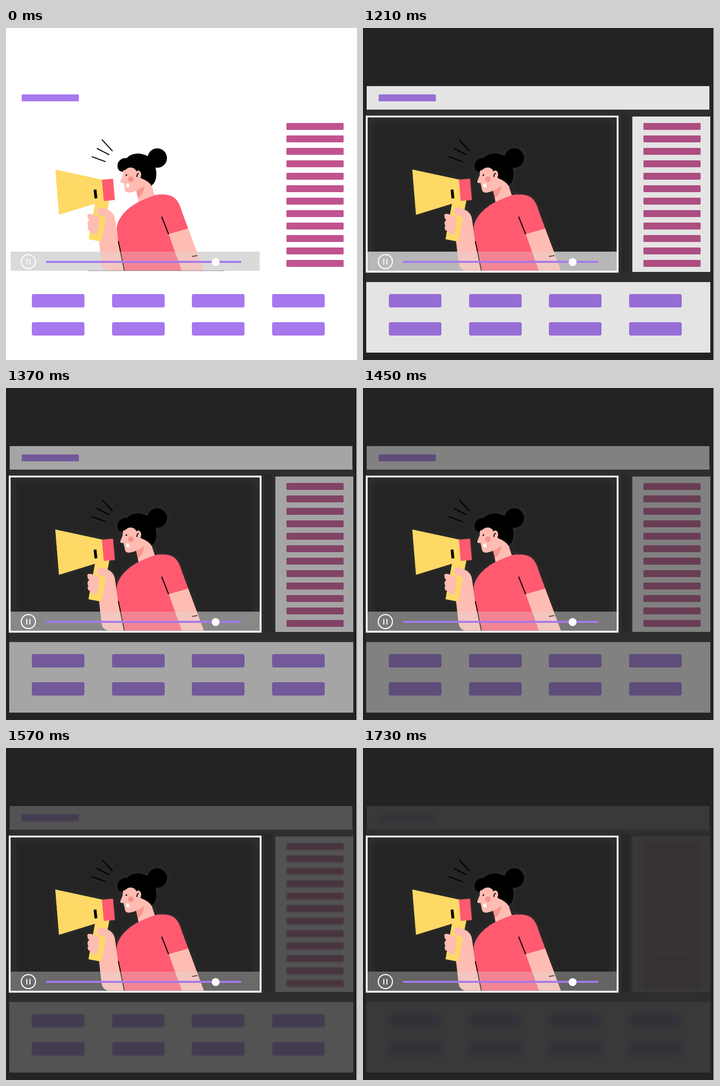
Animation, 761 px wide and 720 px high, one loop 2900 ms. Source, as an HTML page:

```html
<!DOCTYPE html>
<html lang="en">
<head>
<meta charset="utf-8">
<title>Video spotlight</title>
<style>
  html, body { margin: 0; width: 100%; height: 100%; overflow: hidden; background: #fff; }
  svg { display: block; width: 100%; height: 100%; }
  .skin { fill: #ffbcb2; }
  .shirt { fill: #ff5a70; }
  .horn { fill: #ffd966; }
  .blush { fill: #f9958f; }
  .line { fill: none; stroke: #000; stroke-width: 2.1; }
  .purple { fill: #a678ee; }
  .pink { fill: #c1538f; }
  .halo { filter: drop-shadow(0 0 8px rgba(70, 66, 60, .4)); }
  .rim { fill: none; stroke: #2e2e2e; stroke-width: 14; filter: blur(6px); }
</style>
</head>
<body>
<svg viewBox="0 0 761 720" xmlns="http://www.w3.org/2000/svg">
  <defs>
    <filter id="soft" filterUnits="userSpaceOnUse" x="0" y="100" width="761" height="620">
      <feGaussianBlur id="blur" stdDeviation="0"/>
    </filter>
  </defs>

  <g id="night">
    <rect width="760" height="720" fill="#232323"/>
    <rect x="7" y="170" width="746" height="390" fill="#2e2e2e"/>
    <rect x="560" y="186" width="18" height="344" fill="#282828"/>
    <rect x="8" y="192" width="544" height="336" fill="#242424"/>
    <rect class="rim" x="14" y="198" width="532" height="324"/>
    <use class="halo" href="#speaker"/>
  </g>

  <g id="panels" fill="#fff">
    <rect x="8" y="126" width="743" height="51"/>
    <rect x="584" y="192" width="169" height="337"/>
    <rect x="7" y="551" width="746" height="153"/>
  </g>
  <g id="bars"></g>
  <use id="shade" href="#panels" style="filter: brightness(.141)"/>
  <g id="hairlines">
    <rect x="9" y="176" width="741" height="1" fill="#f6efe8"/>
    <rect x="9" y="194" width="541" height="1" fill="#eee"/>
  </g>

  <rect id="controlBack" x="9" y="485" width="542" height="42"/>

  <g id="speaker">
    <path class="line" d="M208 242L231 267M197 261L224 275M186 279L216 290"/>
    <path class="skin" d="M216 392C226 396 234 402 236 414L243 462L257 526H224C214 526 209 520 207 510L202 462L206 420Z"/>
    <path class="horn" d="M107 307L209 329L213 374H224L206 463L179 458L193 381L115 405Z"/>
    <path class="shirt" d="M208 329L232 327L236 373L212 375Z"/>
    <path d="M190 351L196 350L198 369L192 370Z"/>
    <path class="skin" d="M197 398C197 389 208 388 216 392C226 396 234 402 236 414L234 425L216 411C208 409 199 406 197 398Z"/>
    <path class="skin" d="M177 404C183 401 196 407 201 410C206 414 205 419 200 420C204 425 203 432 199 434C202 441 199 448 193 447C187 446 182 443 182 440C177 439 176 432 179 429C176 426 176 419 181 417C177 414 176 408 177 404Z"/>

    <path class="skin" d="M282 350L313 333L324 368L288 380Z"/>
    <path class="blush" d="M282 352L300 343C299 354 294 363 286 369Z"/>
    <path class="shirt" d="M240 436C240 412 264 389 288 377C300 371 316 365 322 363C336 359 358 361 366 369C376 378 379 391 382 400L395 435L353 447L381 526H257L243 462Z"/>
    <path class="skin" d="M353 447L395 435L429 526H381Z"/>
    <path class="line" d="M337.5 409L352.5 447M243.5 462L256.5 526M403 495.5L415 493.5"/>

    <circle cx="328" cy="282" r="21"/>
    <path d="M242 302C240 290 250 281 262 282C270 273 285 270 297 274C315 278 326 295 326 317C326 330 321 338 315 342L290 326L262 309C256 313 244 314 242 302Z"/>
    <path class="skin" d="M254 309C257 309 260 307 262 305C270 300 278 303 282 309L293 326C302 329 311 335 315 341L299 343C294 347 285 353 272 356C265 358 259 357 258 350L255 336C250 337 247 335 248 332L253 320Z"/>
    <ellipse class="skin" cx="287" cy="318" rx="6" ry="9"/>
    <path class="line" d="M288 315C284 316 284 319 284 323"/>
    <circle cx="261" cy="319" r="1.7"/>
    <circle class="blush" cx="271" cy="328" r="6.5"/>
    <ellipse cx="264" cy="341.5" rx="3.4" ry="4.6" fill="#fff" transform="rotate(-12 264 341.5)"/>
  </g>

  <rect x="9" y="485" width="542" height="42" fill="#d9d9d9" fill-opacity=".33"/>
  <rect x="8" y="192" width="544" height="336.5" fill="none" stroke="#fff" stroke-width="4"/>
  <rect id="baseline" x="178" y="526" width="296" height="1" fill="#8e8896"/>
  <g fill="#fff">
    <circle cx="48.5" cy="506.6" r="15.3" fill="none" stroke="#fff" stroke-width="2.3"/>
    <rect x="44" y="501" width="2.2" height="12"/>
    <rect x="50.8" y="501" width="2.2" height="12"/>
    <rect class="purple" x="87" y="505" width="423" height="4.3"/>
    <circle cx="454.5" cy="507.7" r="8.6"/>
  </g>
</svg>
<script>
  const LOOP = 2900, STEP = 40, FADE_START = 1090, FADE_END = 1730, BLUR_START = 1530;
  const GREY = 217, DARK = 36, GLASS = 0.33, MAX_SHADE = 0.9;
  const $ = id => document.getElementById(id);
  const show = (id, on) => $(id).setAttribute('visibility', on ? 'visible' : 'hidden');

  function addBar(kind, x, y, width, height, rx) {
    const bar = document.createElementNS('http://www.w3.org/2000/svg', 'rect');
    const attrs = { class: kind, x, y, width, height, rx };
    for (const name in attrs) bar.setAttribute(name, attrs[name]);
    $('bars').append(bar);
  }

  addBar('purple', 34, 144, 124, 15, 2);
  for (let i = 0; i < 12; i++) addBar('pink', 608, 206 + 27 * i, 124, 15, 2);
  for (let i = 0; i < 8; i++) {
    addBar('purple', Math.round(56 + 173.6 * (i % 4)), i < 4 ? 577 : 638, 114, 29, 4);
  }

  // Brightness behind the translucent control bar for a given shade strength.
  function backdrop(shade) {
    const veil = shade * (1 - GLASS);
    const mixed = (GREY * GLASS + DARK * veil) / (GLASS + veil);
    return Math.round((mixed - GREY * GLASS) / (1 - GLASS));
  }

  function draw(time) {
    const held = time < FADE_START ? 0
      : Math.min(FADE_END, FADE_START + Math.floor((time - FADE_START) / STEP) * STEP);
    const progress = held ? (held - FADE_START + STEP) / (FADE_END - FADE_START + STEP) : 0;
    const shade = MAX_SHADE * (1 - Math.cos(Math.PI * progress)) / 2;
    const night = held > FADE_START;
    const blur = Math.max(0, (held - BLUR_START) / 25);
    const level = backdrop(shade);

    show('night', night);
    show('hairlines', held === FADE_START);
    show('baseline', !night);
    $('shade').setAttribute('opacity', shade);
    $('controlBack').setAttribute('fill', `rgb(${level},${level},${level})`);
    $('bars').setAttribute('opacity', 1 - 0.3 * shade * shade);
    $('blur').setAttribute('stdDeviation', blur);
    if (blur) $('bars').setAttribute('filter', 'url(#soft)');
    else $('bars').removeAttribute('filter');
  }

  const start = performance.now();
  function tick() {
    draw((performance.now() - start) % LOOP);
    requestAnimationFrame(tick);
  }
  tick();
</script>
</body>
</html>
```
